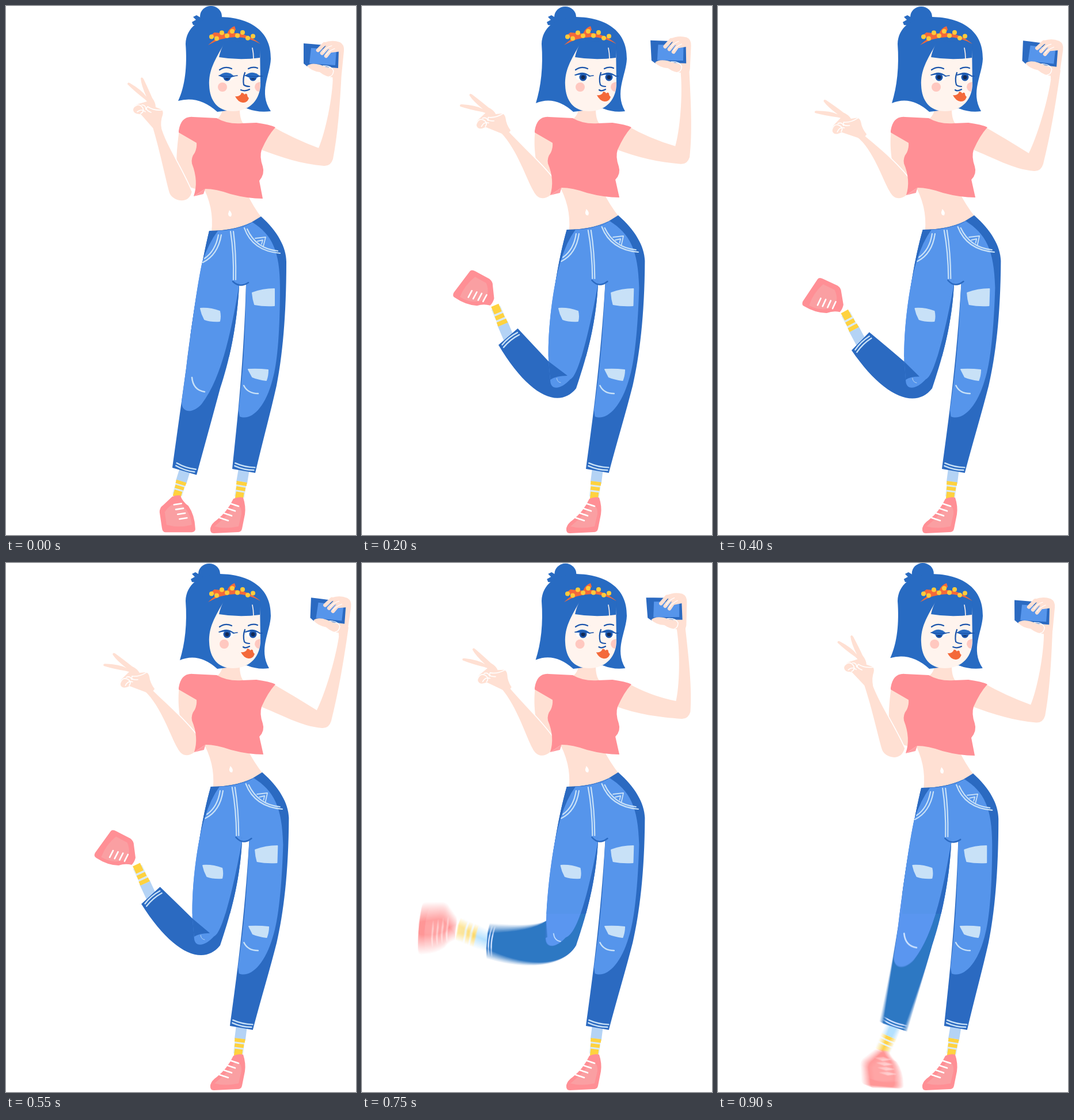
An HTML page with a canvas for the animation above (0.95 s loop, 608 px wide and 920 px high).

```html
<!DOCTYPE html>
<html>
<head>
<meta charset="utf-8">
<style>
html, body { margin: 0; height: 100%; overflow: hidden; background: #fff; }
canvas { display: block; width: 100vw; height: 100vh; }
</style>
</head>
<body>
<canvas id="stage" width="608" height="920"></canvas>
<script>
const W = 608, H = 920, LOOP = 950, STEP = 50, SHUTTER = 16, RAD = Math.PI / 180;
const DARK = '#2b6ac1', LIGHT = '#5695eb', PALE = '#c8e1f7', HAIR = '#286bc2', NAVY = '#1c55ab';
const SKIN = '#ffe0d3', FACE = '#fff4ee', PINK = '#ff8f95', YELLOW = '#ffd23f', ORANGE = '#f4693a';

const layer = () => Object.assign(document.createElement('canvas'), { width: W, height: H }).getContext('2d');
const main = document.getElementById('stage').getContext('2d');
const sample = layer(), smear = layer();
let g = main, sway = 0;

const mix = (a, b, k) => a + (b - a) * k;
const mixPoint = (p, q, k) => [mix(p[0], q[0], k), mix(p[1], q[1], k)];
const clamp = k => Math.min(1, Math.max(0, k));

// Motion: a slow start and a soft stop, used for rising and falling alike
function ease(k) {
  const x = clamp(k) ** 1.35;
  return x * x * (3 - 2 * x);
}
const pulse = (t, rise, riseTime, fall, fallTime) => ease((t - rise) / riseTime) - ease((t - fall) / fallTime);
const settle = t => Math.sin(Math.PI * clamp((t - 200) / 400));
const lift = t => pulse(t, 0, 200, 570, 350) - .042 * settle(t);

// Moves hips and legs sideways with the weight shift
function bodyPath(d) {
  return d.replace(/([\d.]+),([\d.]+)/g, (m, x, y) => {
    if (y < 300) return m;
    const dx = Math.min(Math.max(0, 2 + (y - 366) * .03), (670 - y) * .03);
    return `${+x + sway * dx},${+y - (y < 490 ? 2 * sway : 0)}`;
  });
}
const fill = (color, d) => { g.fillStyle = color; g.fill(new Path2D(d)); };
function line(color, width, d) {
  g.strokeStyle = color;
  g.lineWidth = width;
  g.stroke(new Path2D(d));
}
const bodyFill = (color, d) => fill(color, bodyPath(d));
const bodyLine = (color, width, d) => line(color, width, bodyPath(d));
function oval(color, x, y, rx, ry = rx) {
  g.fillStyle = color;
  g.beginPath();
  g.ellipse(x, y, rx, ry, 0, 0, 7);
  g.fill();
}
function placed(x, y, degrees, draw) {
  g.save();
  g.translate(x, y);
  g.rotate(degrees * RAD);
  draw();
  g.restore();
}

function sock(x0, y0, x1, y1) {
  const at = k => mixPoint([x0, y0], [x1, y1], k);
  g.lineCap = 'butt';
  line('#b4d3f5', 19, `M${at(-.1)}L${at(.45)}`);
  line('#d9eafa', 17, `M${at(.4)}L${at(.95)}`);
  for (let i = 0; i < 3; i++) line(YELLOW, 18 - 2 * i, `M${at(.4 + .19 * i)}L${at(.53 + .19 * i + (i > 1 ? .12 : 0))}`);
  g.lineCap = 'round';
}

const cuffStitch = () => line(PALE, 2.4, 'M-17,-10Q0,-6 18,-9M-17,-5Q0,-1 17,-4');

function laces(x, y, stepX, dx, dy) {
  for (let i = 0; i < 4; i++) line('#fff', 2.6, `M${x + stepX * i},${y + 8.3 * i}l${dx},${dy}`);
}

function leftShoe() {
  g.translate(-296, -852);
  fill(PINK, 'M288,853Q295,850 302,851Q306,862 316,869Q327,885 328,908Q329,914 322,915L276,915Q271,915 270,907L266,880Q266,872 272,868Z');
  fill('#fa9fa2', 'M275,880Q286,862 302,866Q320,878 322,902Q300,908 278,902Z');
  laces(291, 867, 3.2, 13, -2);
}

// k = 0 stands straight, k = 1 is fully bent
function leftLeg(k) {
  const swing = 117 * k, angle = 12.4 + swing, middle = Math.sin(Math.PI * k);
  const polar = (a, r) => [345 - r * Math.sin(a * RAD), 650 + r * Math.cos(a * RAD)];
  const radius = 118 + 45 * (1 - k) ** 1.5, tilt = 16.7 + swing * 1.05;
  const cuff = polar(angle, radius), collar = polar(angle + 1 + 8 * Math.sqrt(k), radius + 45 + 8 * k);
  const ex = 22 * Math.cos(tilt * RAD), ey = 22 * Math.sin(tilt * RAD);
  const front = [cuff[0] - ex, cuff[1] - ey], back = [cuff[0] + ex, cuff[1] + ey];

  const knee = mixPoint([313, 630], [324, 618], k);
  const shin = mixPoint(knee, front, .4).map((v, i) => v + middle * (i ? 11 : 18));
  const heel = mixPoint([360, 710], [342, 702], k);
  const calf = mixPoint(back, heel, .5).map((v, i) => v + i * 32 * k * k);
  const straight = (1 - k) ** 3;
  const lobeL = [mix(305, 327, k), 650 + 38 * straight], lobeR = [mix(340, 362, k), 649 + 43 * straight];
  const crease = mixPoint(lobeL, [357, 643], k ** 6);
  const crotch = `${405 + 5 * sway},${486 - 2 * sway}`;

  sock(...cuff, ...collar);
  placed(...polar(angle + 1 + 8 * Math.sqrt(k), radius + 45 + 17 * k), swing + 10 * k + 15 * middle, leftShoe);
  fill(DARK, bodyPath('M353,391') + `C341,440 325,530 ${knee}Q${shin} ${front}L${back}`
    + `C${calf} ${heel} 372,665C387,620 ${401 + 5 * sway},560 ${crotch}` + bodyPath('L420,484L425,377Q395,391 353,391Z'));
  fill(LIGHT, bodyPath('M368,391Q352,412 341,445') + `C333,480 322,560 ${knee}L${lobeL}`
    + `C${lobeL[0]},${lobeL[1] + 20} ${lobeR[0] - 16},${lobeR[1] + 18} ${lobeR}`
    + `C376,645 ${392 + 4 * sway},560 ${crotch}` + bodyPath('L420,484L425,377Q400,390 368,391Z'));
  fill(DARK, `M${knee}L${crease}Q${mix(knee[0], crease[0], .4)},${crease[1]} ${lobeL}Z`);

  const s = 1 - .7 * k, y = 671 - 16 * Math.sqrt(k);
  line(PALE, 2.6 * s, `M${345 - 22 * s},${y - 25 * s}Q${345 - 20 * s},${y - 3 * s} 345,${y}`);
  placed(...cuff, tilt, cuffStitch);
  placed(4 * sway + 4 * middle, 0, 0, () => patch('M338,526Q355,525 371,531Q373,540 371,548Q356,549 345,545Q340,536 338,526Z'));
}

function patch(d) {
  fill(PALE, d);
  line(PALE, 2, d);
}

function smearedLeg(t) {
  const moving = Math.abs(lift(t + SHUTTER / 2) - lift(t - SHUTTER / 2)) > .01, n = moving ? 15 : 1;
  smear.globalCompositeOperation = 'lighter';
  smear.clearRect(0, 0, W, H);
  smear.globalAlpha = 1 / n;
  g = sample;
  g.lineCap = g.lineJoin = 'round';
  for (let i = 0; i < n; i++) {
    g.clearRect(0, 0, W, H);
    leftLeg(clamp(lift(t + ((i + .5) / n - .5) * SHUTTER)));
    smear.drawImage(sample.canvas, 0, 0);
  }
  g = main;
  g.drawImage(smear.canvas, 0, 0);
  // The thigh stays sharp
  g.save();
  g.beginPath();
  g.rect(320, 370, 120, 240);
  g.clip();
  leftLeg(clamp(lift(t)));
  g.restore();
}

function rightLeg() {
  const c = -4 * sway;
  sock(413 + c, 808, 405 + c / 2, 856);
  fill(PINK, 'M395,857Q404,853 412,855Q417,870 415,884L410,909Q409,915 402,915L361,917Q354,917 355,908Q357,900 366,894Q384,880 395,857Z');
  fill('#fa9fa2', 'M362,905Q388,884 398,866Q410,868 409,884L404,905Q380,910 362,905Z');
  laces(389, 865, -6, 15, 5);
  bodyFill(DARK, 'M420,380L443,366C472,392 487,420 487,445C487,540 480,610 470,660C460,705 445,760 433,812L393,805C402,720 413,620 417,484L405,486L395,392Z');
  bodyFill(LIGHT, 'M390,390Q410,387 428,376C462,398 476,425 476,490C476,560 472,620 463,650C450,700 425,722 406,714L404,704C411,640 415,600 417,484L405,486Z');
  placed(413 + c, 808, 11, cuffStitch);
  patch(bodyPath('M428,499Q446,492 466,492L466,521Q447,522 432,519Q429,510 428,499Z'));
  patch(bodyPath('M421,632Q438,631 455,633Q455,643 452,651Q438,649 428,645Z'));
  bodyLine(PALE, 2.4, 'M413,660Q420,674 438,674');
  bodyLine(PALE, 2.2, 'M390,392Q396,430 395,476M395,392Q400,430 399,476M374,398Q368,433 342,446M369,398Q364,426 345,439M414,386Q428,426 476,430M419,388Q434,422 472,426');
  bodyLine(PALE, 1.8, 'M433,404L451,402L447,418M437,409L446,407L444,414');
  bodyLine(DARK, 2.5, 'M394,479Q406,491 421,481');
}

function peaceArm(a, turn, drop) {
  const wx = 260 - 14 * a, wy = 206 + 16 * drop, to = (x0, y0, x1, y1) => `${mixPoint([x0, y0], [x1, y1], a)}`;
  const elbow = to(323, 322, 342, 312), c1 = to(278, 240, 285, 250), c2 = to(305, 280, 315, 275), wrist = [wx + 10, wy + 4];
  fill(SKIN, `M301,215C296,255 ${to(293, 280, 306, 280)} ${to(303, 310, 310, 322)}L335,320L335,235Z`);
  fill(SKIN, `M${wx - 5},${wy + 5}C${to(268, 255, 270, 250)} ${to(277, 300, 286, 302)} ${to(284, 325, 298, 322)}`
    + `C${to(288, 338, 306, 338)} ${to(318, 348, 322, 342)} ${elbow}C${c2} ${c1} ${wrist}Z`);
  line('#fff', 1.6, `M${wrist}C${c1} ${c2} ${elbow}`);
  placed(wx, wy, -turn, () => {
    g.translate(-260, -206);
    fill(SKIN, 'M255,212L234,188Q221,188 221,180Q222,172 231,170L245,166L241,162Q224,149 211,136Q211,132 215,134Q236,146 244,158Q235,138 234,126Q236,122 239,127Q249,148 254,160Q260,168 260,176L270,180Q274,183 272,190Q268,200 270,213Q262,218 255,212Z');
    line('#fff', 1.6, 'M221,177Q230,168 236,175Q242,183 234,187M228,184Q236,178 242,184M236,172Q243,172 243,180M271,181Q256,182 246,175Q240,180 252,185');
  });
}

function phoneArm(px, py, ey) {
  const ex = -.35 * ey, q = (x, y, k) => `${x + mix(ex, px, k)},${y + mix(ey, py, k)}`;
  fill(SKIN, `M460,208Q500,231 ${q(543, 247, 0)}C${q(554, 222, .2)} ${q(568, 160, .7)} ${q(568, 118, 1)}L${q(583, 115, 1)}`
    + `C${q(580, 175, .6)} ${q(576, 225, .2)} ${q(568, 266, 0)}Q${q(564, 279, 0)} ${q(552, 278, 0)}C${q(515, 275, 0)} 480,264 438,248Z`);
  placed(547 + px, 87 + py, px * .2, () => {
    g.translate(-547, -87);
    fill(SKIN, 'M552,64Q566,58 580,63Q588,67 587,78L583,118Q580,131 568,130Q568,120 561,116L570,80Z');
    fill(DARK, 'M517,65L530,66L575,70Q579,72 578,78L577,108L529,104L523,105L517,100Z');
    fill(LIGHT, 'M530,73L574,76L572,103L527,100Z');
    for (let i = 0; i < 3; i++) line(SKIN, 6.5, `M${575 + 2 * i},${68 + 4 * i}L${553 + 5 * i},${66 + 6 * i}L${542 + 7 * i},${77 + 5 * i}`);
    line('#fff', 1.2, 'M566,69Q556,72 551,80M571,74Q561,78 556,85');
    fill(SKIN, 'M523,104Q530,98 545,102L568,110L570,124Q556,124 545,115Q530,113 523,104Z');
    line('#fff', 1.4, 'M551,104Q566,104 569,113Q568,122 561,123');
  });
}

function torso() {
  fill(SKIN, 'M376,170Q378,188 366,197L388,212L412,204Q405,196 406,170Z');
  bodyFill(SKIN, 'M340,310Q362,350 357,392Q405,391 444,368Q430,350 418,325Z');
  bodyFill('#fff', 'M388,355Q394,361 391,366Q386,367 386,361Z');
}

function shirt() {
  bodyFill(PINK, 'M300,217Q304,191 325,193L366,195Q385,206 410,204L435,203Q458,206 468,211Q455,225 444,250Q440,262 446,279Q450,292 440,304L446,335Q420,335 390,327Q365,318 346,318L326,331Q335,305 323,274Q321,264 328,255Q332,246 331,238L300,220Z');
  bodyFill('#ff9ca1', 'M346,318L326,331L343,327Z');
}

function eye(x, lid) {
  oval('#fff', x, 124, 12, 6.5);
  oval(NAVY, x, 124, 6.5);
  oval('#122a55', x, 124, 3.5);
  fill(HAIR, `M${x - 14},121Q${x},110 ${x + 12},122Q${x},${117 + lid * 13} ${x - 14},121Z`);
  line(NAVY, 1.6, `M${x - 14},${120 + lid}Q${x},${114 + lid * 10} ${x + 12},122`);
}

function head(h, lid) {
  oval(HAIR, 356 - 3 * h, 18 + h, 19, 18);
  placed(-2 * h, 0, 0, () => fill(HAIR, 'M346,25L331,16L325,19L330,24L323,28L325,33L350,36Z'));
  fill(HAIR, `M${299 + 3 * h},${165 + 4 * h}C311,140 315,105 312,66C313,38 335,20 372,19C422,20 461,42 460,92C459,120 438,150 ${460 - 3 * h},183Q438,186 418,178L367,184Q335,155 ${299 + 3 * h},${165 + 4 * h}Z`);
  fill(FACE, 'M380,64C362,95 352,112 353,138C354,165 368,183 394,183C426,183 442,160 442,135L441,64Z');
  fill(HAIR, 'M380,62Q372,78 370,89Q405,95 441,90L443,60Z');
  line(FACE, 1.6, 'M428,73Q430,82 430,92');

  oval('#ffc8c0', 376 + 3 * h, 141, 8);
  fill('#ffc8c0', 'M442,132Q432,133 432,141Q433,148 440,149Z');
  eye(384, lid);
  eye(429, lid);
  line(NAVY, 1.6, 'M394,122L402,121M440,122L445,122');
  line(NAVY, 2.2, 'M371,111Q381,104 392,109M421,109Q429,105 437,108');
  line(NAVY, 2.2, `M415,116Q411,126 ${413 + h},137Q417,140 423,140M423,145Q416,149 ${408 + 4 * h},146`);
  placed(10 * h, -2 * h, 0, () =>
    fill(ORANGE, 'M398,157Q407,158 409,151Q413,151 414,154Q417,151 419,154Q419,158 422,160Q419,169 411,168Q403,167 398,157Z'));

  fill(ORANGE, 'M351,68Q394,27 442,66Q398,41 351,68Z');
  fill(ORANGE, 'M353,53L362,46L384,48Q388,38 397,35L399,41L391,53L372,57Z');
  for (let i = 0; i < 9; i++) {
    const x = 357 + 9 * i;
    oval('#ffcb3c', x, 43 + (x - 394) ** 2 * .007 + (i % 2 ? 8 : 1), 4);
  }
}

function frame() {
  const t = Math.floor(performance.now() % LOOP / STEP) * STEP;
  const hand = pulse(t, 0, 140, 660, 275), hold = pulse(t, 50, 330, 560, 190), rest = settle(t);
  sway = clamp(3 * lift(t));
  g = main;
  g.fillStyle = '#fff';
  g.fillRect(0, 0, W, H);
  g.lineCap = g.lineJoin = 'round';
  torso();
  smearedLeg(t);
  rightLeg();
  peaceArm(hand, 27 * hand + 3 * rest, .55 * hand + .45 * rest);
  phoneArm(37 * hold - 25 * hand, 4.5 * hold - 8 * hand, 17 * hold - 8 * hand);
  shirt();
  head(hand, 1 - pulse(t, 60, 130, 640, 240));
  requestAnimationFrame(frame);
}
frame();
</script>
</body>
</html>
```
